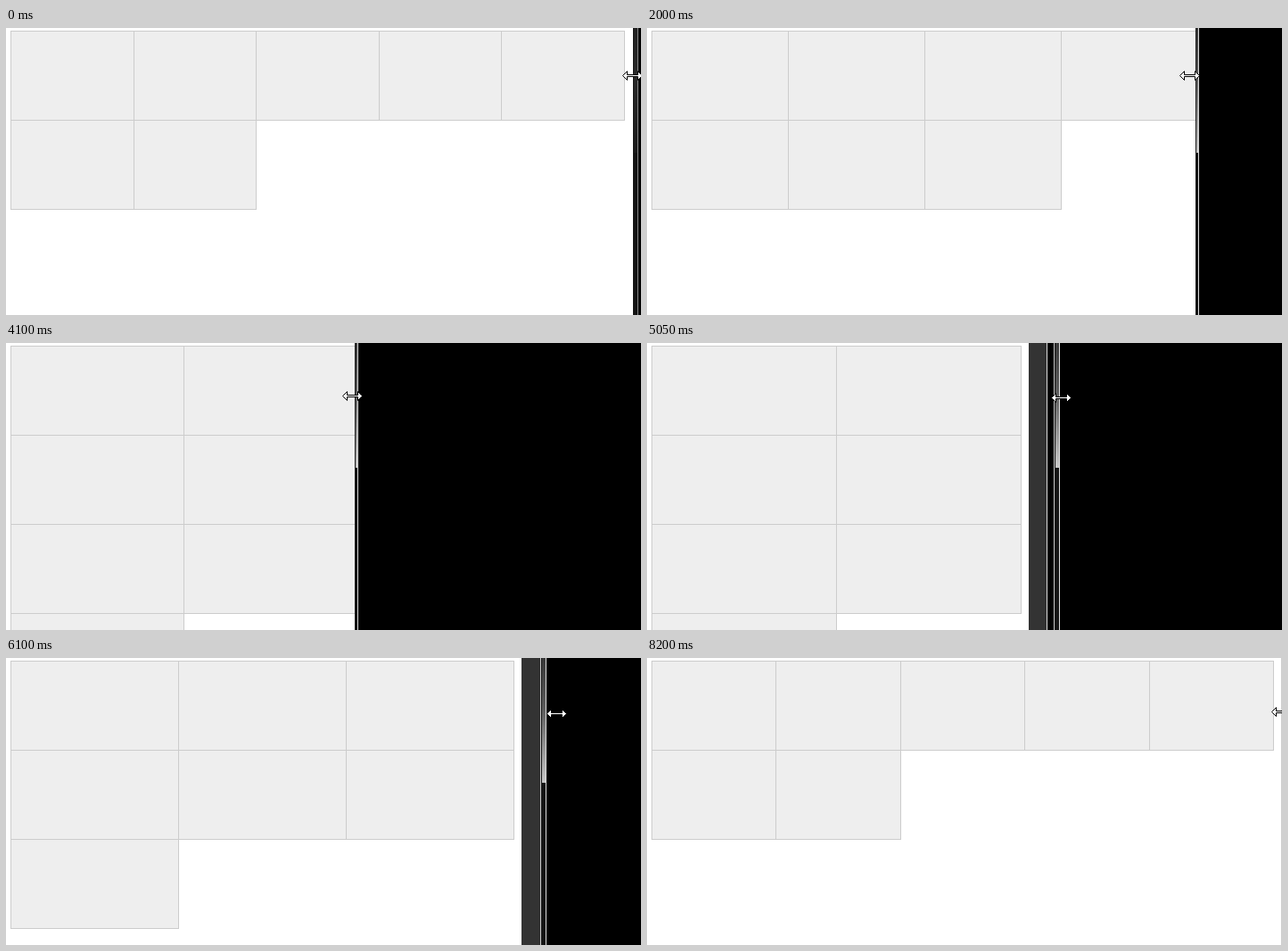
An HTML page with a canvas that plays this animation: 712x322 px, repeating every 8.25 s.

```html
<!DOCTYPE html>
<html lang="en">
<head>
<meta charset="utf-8">
<title>Responsive grid resize</title>
<style>
html, body { margin: 0; width: 100%; height: 100%; overflow: hidden; background: #fff; }
canvas { display: block; }
</style>
</head>
<body>
<canvas id="stage" width="712" height="322"></canvas>
<script>
const ctx = document.getElementById('stage').getContext('2d');
const WIDTH = 712, HEIGHT = 322, LOOP = 8250, STEP = 50;
const LEFT = 5, TOP = 3, CELL_H = 100, ITEMS = 7;
const FRAME_LAG = 60, CONTENT_LAG = 270;

// Drag path of the pointer: time, x
const DRAG = [
  [550, 702], [1400, 657], [1730, 626], [2000, 608], [2930, 484], [3200, 476],
  [3950, 388], [4480, 388], [5050, 464], [5830, 578], [6040, 599],
  [6100, 617], [6630, 678], [6900, 678], [7730, 711]
];

function dragX(t) {
  const i = DRAG.findIndex(k => k[0] > t);
  if (i === 0) return DRAG[0][1];
  if (i < 0) return DRAG[DRAG.length - 1][1];
  const [t0, x0] = DRAG[i - 1], [t1, x1] = DRAG[i];
  return x0 + (x1 - x0) * (t - t0) / (t1 - t0);
}

// The window frame follows the pointer, the page content follows later
const frameEdge = t => Math.round(dragX(t - FRAME_LAG)) + 7;
const gridRight = t => Math.round(dragX(t - CONTENT_LAG)) - 9;
const pointerY = t => 53.5 + Math.round(9 * Math.sin(Math.PI / 2 * Math.max(0, t - 2000) / 4200));

function rect(x, y, w, h, color) {
  ctx.fillStyle = color;
  ctx.fillRect(x, y, w, h);
}

function drawGrid(right) {
  const cols = right >= 690 ? 5 : right >= 590 ? 4 : right >= 440 ? 3 : 2;
  const lineX = i => Math.round(LEFT + i * (right - LEFT) / cols);
  for (let i = 0; i < ITEMS; i++) {
    const col = i % cols;
    const x = lineX(col), y = TOP + Math.floor(i / cols) * CELL_H;
    const w = lineX(col + 1) - x;
    rect(x, y, w + 1, CELL_H + 1, '#ccc');
    rect(x + 1, y + 1, w - 1, CELL_H - 1, '#eee');
  }
}

function drawFrame(t, edge, right) {
  const gap = edge - right > 17;
  const page = gap ? right + 9 : Math.min(right + 10, edge - 4);
  rect(page, 0, WIDTH, HEIGHT, '#000');

  // Unpainted area and trailing frame line while the window grows
  if (gap) {
    const moved = edge - frameEdge(t - STEP);
    const trail = moved > 6 ? moved + 1 : 0;
    const end = Math.max(page, edge - 7 - trail);
    rect(page, 0, end - page, HEIGHT, '#333');
    if (trail) rect(end, 0, 1, HEIGHT, '#ddd');
  }

  const idle = t < 200;
  const x = gap ? edge - 6 : page, w = edge - 1 - x;
  const shade = ctx.createLinearGradient(0, 0, 0, 140);
  shade.addColorStop(0, idle ? '#222' : '#3a3a3a');
  shade.addColorStop(0.4, idle ? '#2a2a2a' : '#5c5c5c');
  shade.addColorStop(1, idle ? '#1a1a1a' : '#c8c8c8');
  rect(x, 0, w, HEIGHT, '#141414');
  rect(x + 1, 0, w - 1, 140, shade);
  rect(edge - 1, 0, 1, HEIGHT, idle ? '#888' : '#ddd');
  if (gap || edge > WIDTH) rect(edge - 7, 0, 1, HEIGHT, '#ccc');
}

function drawPointer(x, y) {
  const upper = [[-11, 0], [-6, -5], [-6, -1], [6, -1], [6, -5], [11, 0]];
  const lower = upper.slice(1, -1).reverse().map(([px, py]) => [px, -py]);
  ctx.beginPath();
  for (const [px, py] of [...upper, ...lower]) ctx.lineTo(x + px, y + py);
  ctx.closePath();
  ctx.fillStyle = '#fff';
  ctx.strokeStyle = '#000';
  ctx.lineWidth = 1;
  ctx.fill();
  ctx.stroke();
}

function draw(t) {
  const right = gridRight(t);
  rect(0, 0, WIDTH, HEIGHT, '#fff');
  drawGrid(right);
  drawFrame(t, frameEdge(t), right);
  drawPointer(Math.round(dragX(t)) + 0.5, pointerY(t));
}

const start = performance.now();
function tick() {
  const t = (performance.now() - start) % LOOP;
  draw(Math.floor(t / STEP) * STEP);
  requestAnimationFrame(tick);
}
tick();
</script>
</body>
</html>
```
